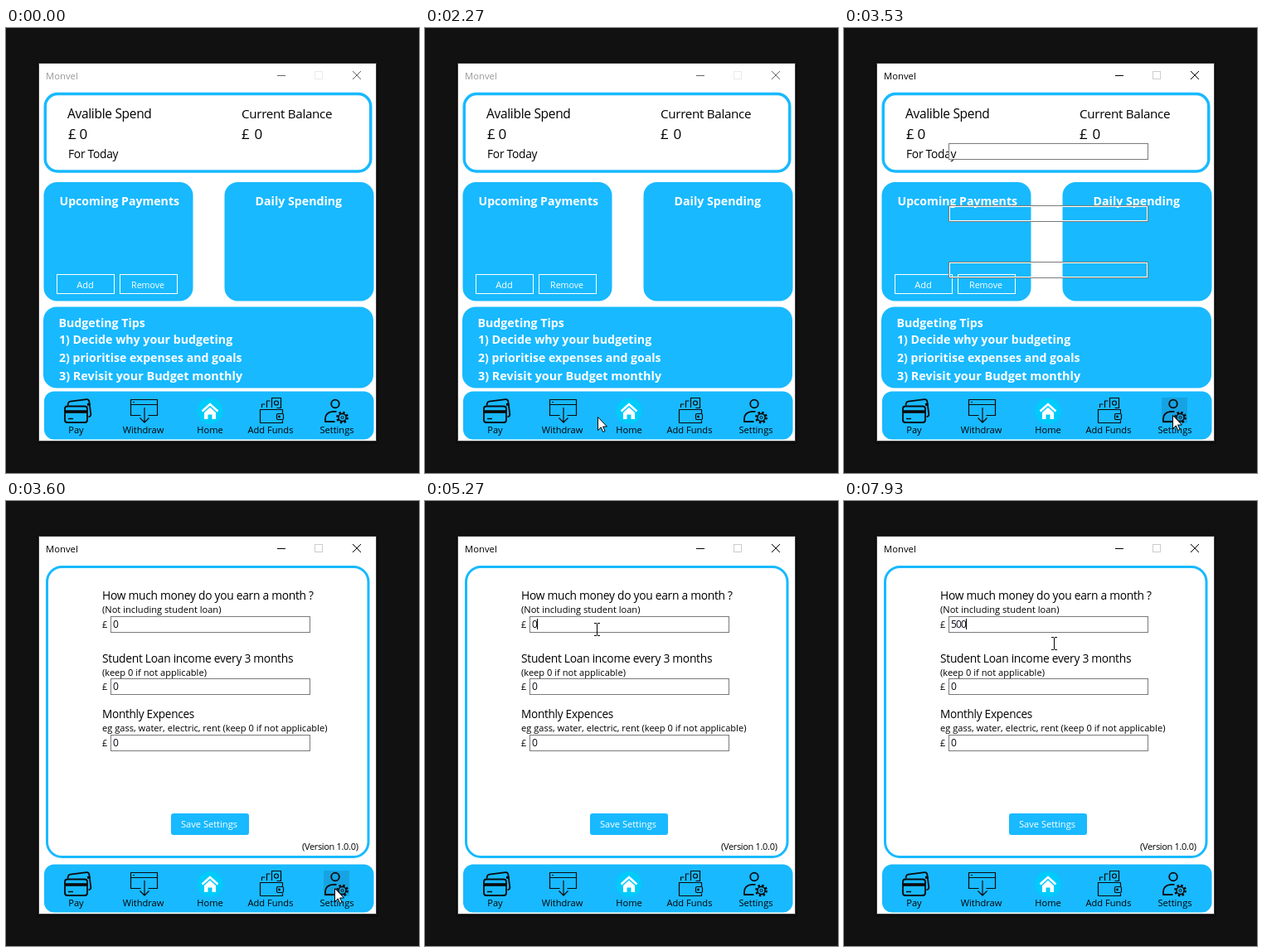
These frames come from a looping animation (498x537 px, 8000 ms). An HTML page:

```html
<!DOCTYPE html>
<html lang="en">
<head>
<meta charset="utf-8">
<title>Budget app</title>
<style>
  html, body { margin: 0; width: 100%; height: 100%; overflow: hidden; background: #111; }
  svg { display: block; width: 498px; height: 537px; }
  text { font: 500 11.1px "Open Sans", "Noto Sans", sans-serif; fill: #000; white-space: pre; }
  .big { font-weight: 400; letter-spacing: -.02em; }
  .head { font-weight: 700; fill: #fff; }
  .mid { text-anchor: middle; }
  .light { fill: #fff; }
  .value { font-size: 12px; font-weight: 400; letter-spacing: -.86px; fill: #0a0a18; }
  .blue { fill: #18b9ff; }
  .frame { fill: #fff; stroke: #18b9ff; }
  .icon { fill: none; stroke: #0a0a0a; stroke-linejoin: round; }
  .hover { fill: #17a3e2; visibility: hidden; }
  .crisp { shape-rendering: crispEdges; }
</style>
</head>
<body>
<svg viewBox="0 0 498 537">
  <rect width="498" height="537" fill="#111"/>
  <rect x="37" y="41" width="412" height="461" rx="3" fill="#0c0c0c"/>
  <rect x="39" y="42" width="408" height="457" fill="#3a3a3a"/>
  <rect x="40" y="43" width="406" height="455" fill="#fff"/>

  <text id="title" x="48" y="62" style="font-size:11.3px;font-weight:400">Monvel</text>
  <g id="bar">
    <path class="crisp" d="M327 57.5h10" stroke="#000"/>
    <path id="max" class="crisp" d="M372.5 52.5h9v9h-9z" fill="none"/>
    <path d="M418 52l10 10m0-10l-10 10" stroke="#000"/>
  </g>

  <g id="home">
    <rect class="frame" x="47.25" y="79.5" width="392.5" height="93.5" rx="15" stroke-width="3.5"/>
    <text class="big" x="74" y="109" style="font-size:15.5px">Avalible Spend</text>
    <text class="big" x="284" y="109" style="font-size:15.2px">Current Balance</text>
    <text class="big" x="75" y="134" style="font-size:17px">£ 0</text>
    <text class="big" x="284" y="134" style="font-size:17px;word-spacing:2px">£ 0</text>
    <text class="big" x="75" y="157" style="font-size:13.8px">For Today</text>

    <rect class="blue" x="45.5" y="186" width="180" height="143.5" rx="16"/>
    <rect class="blue" x="263.5" y="186" width="180" height="143.5" rx="16"/>
    <rect class="blue" x="45" y="336.5" width="398" height="98" rx="16"/>
    <text class="head" x="64.5" y="214" style="font-size:14.1px">Upcoming Payments</text>
    <text class="head" x="300.5" y="214" style="font-size:14.2px">Daily Spending</text>
    <path class="crisp" d="M61.5 297.5h69v23h-69zM137.5 297.5h69v23h-69z" fill="none" stroke="#fff"/>
    <text class="mid light" x="95.5" y="314">Add</text>
    <text class="mid light" x="171" y="314" style="font-size:10.6px">Remove</text>
    <text class="head" x="63.5" y="361" style="font-size:14.2px">Budgeting Tips</text>
    <text class="head" x="64" y="381" style="font-size:14.2px">1) Decide why your budgeting</text>
    <text class="head" x="64" y="403" style="font-size:14.1px">2) prioritise expenses and goals</text>
    <text class="head" x="64" y="425" style="font-size:14.4px">3) Revisit your Budget monthly</text>
  </g>

  <g id="settings">
    <rect class="frame" x="49.5" y="79.5" width="387.5" height="350" rx="18" stroke-width="3"/>
    <text class="big" x="116" y="119" style="font-size:13.8px">How much money do you earn a month ?</text>
    <text x="116" y="135">(Not including student loan)</text>
    <text class="big" x="116" y="195" style="font-size:13.8px">Student Loan income every 3 months</text>
    <text x="116" y="211">(keep 0 if not applicable)</text>
    <text class="big" x="116" y="262" style="font-size:13.6px">Monthly Expences</text>
    <text x="116" y="278">eg gass, water, electric, rent (keep 0 if not applicable)</text>
    <text x="116" y="153">£</text>
    <text x="116" y="228">£</text>
    <text x="116" y="296">£</text>
    <rect class="blue" x="199" y="377" width="94" height="26" rx="3"/>
    <text class="mid light" x="245" y="394">Save Settings</text>
    <text x="357" y="421" style="font-size:11px;font-weight:400;letter-spacing:-.03em">(Version 1.0.0)</text>
  </g>

  <g id="fields" class="crisp"></g>
  <g id="values">
    <text id="typed" class="value" x="129" y="153"></text>
    <text class="value" x="129" y="228">0</text>
    <text class="value" x="129" y="296">0</text>
    <rect id="caret" class="crisp" y="142" width="1" height="13"/>
  </g>

  <rect class="blue" x="46" y="438.5" width="397.5" height="58" rx="12"/>
  <g id="hovers"></g>

  <g class="icon" stroke-width="1.8">
    <rect x="71" y="456.5" width="27" height="19.5" rx="3"/>
    <path d="M71 463h27" stroke-width="3.6"/>
    <path d="M75 471.5h6" stroke-width="1.4"/>
    <path d="M74.5 455.5l.4-2.5q.4-2 2.600-2.300l19.500-2.500q2.800-.2 3.300 2.400l2 15.500q.2 2.600-2.800 3.200"/>
    <path d="M98 454.500l3.500-.5" stroke-width="3"/>
  </g>
  <g class="icon" stroke-width="1.2">
    <path d="M162.500 467.500h-12v-19h32v19h-11M150.500 454.500h32M153 451.500h2"/>
    <path d="M167 458v18m-5.500-5.500l5.500 5.500l5.500-5.500"/>
  </g>
  <g>
    <circle cx="246" cy="462.5" r="15.5" fill="#00cbfa"/>
    <path d="M236.500 462.500l9.500-8.500l9.500 8.500" fill="none" stroke="#fff" stroke-width="2.6"/>
    <path d="M239 464l7-6.200l7 6.200v8h-4.500v-5.500h-5v5.500h-4.500z" fill="#fff"/>
  </g>
  <g class="icon" stroke-width="1.2">
    <path d="M306.500 476.500v-16h27v4.500M306.500 476.500h27v-3"/>
    <rect x="326.5" y="465.5" width="8" height="7" rx="1.5"/>
    <circle cx="329.5" cy="469" r=".8"/>
    <path d="M308.500 458v-4h4M314.500 458v-8h4M320.500 458v-11.500h11v12h-5"/>
    <circle cx="326" cy="452.500" r="2.500"/>
  </g>
  <g class="icon" stroke-width="1.8">
    <circle cx="397" cy="453.5" r="4.8"/>
    <path d="M396.500 475h-11.500v-3q0-8.500 9-9.200h4.500"/>
    <circle cx="405.5" cy="470" r="4.6" stroke-width="1.6"/>
    <circle cx="405.5" cy="470" r="6.2" stroke-width="2.4" stroke-dasharray="2.435"/>
    <circle cx="405.5" cy="470" r="1.6" stroke-width="1"/>
  </g>
  <g id="labels"></g>

  <path id="arrow" d="M.5.5v16l3.800-3.600l2.500 5.600l2.300-1l-2.500-5.500h4.900z" fill="#fff" stroke="#000"/>
  <path id="beam" class="crisp" d="M0 .5h3m1 0h3M3.500 1v14M0 15.500h3m1 0h3" fill="none" stroke="#000"/>
</svg>

<script>
const LOOP = 8000, FPS = 15;
const $ = id => document.getElementById(id);
const show = (el, on) => { el.style.visibility = on ? 'visible' : 'hidden'; };

function add(parent, tag, attrs, text = '') {
  const el = document.createElementNS('http://www.w3.org/2000/svg', tag);
  for (const k in attrs) el.setAttribute(k, attrs[k]);
  el.textContent = text;
  return parent.appendChild(el);
}

// Navigation: label, label centre, left edge and width of the icon
const nav = [
  ['Pay', 84.5, 70, 33], ['Withdraw', 165.5, 150, 33], ['Home', 246, 231, 31],
  ['Add Funds', 319, 305, 31], ['Settings', 399, 383, 31]
].map(([name, cx, x, w]) => {
  add($('labels'), 'text', { class: 'mid', x: cx, y: 489 }, name);
  return { x, w, el: add($('hovers'), 'rect', { class: 'hover', x, y: 446, width: w, height: 31 }) };
});

const fields = [139, 214, 282].map(y => ({
  y,
  inner: add($('fields'), 'rect', { x: 127.5, y: y + 1.5, width: 238, height: 17, stroke: '#fff' }),
  outer: add($('fields'), 'rect', { x: 126.5, y: y + .5, width: 240, height: 19, fill: 'none' })
}));

const ease = {
  in: u => u ** 1.5,
  out: u => 1 - (1 - u) ** 2,
  both: u => u * u * (3 - 2 * u),
  hold: () => 0
};

// Pointer: tick, x, y, easing towards the next row
const path = [
  [22, 296, 530, 'out'], [34, 208, 469, 'hold'], [35, 208, 469, 'both'],
  [46, 396, 468, 'hold'], [50, 396, 467, 'hold'], [54, 396, 467, 'in'],
  [64, 290, 223, 'out'], [68, 184, 143, 'both'], [77, 207, 155, 'hold'],
  [119, 253, 172, 'hold']
];

// Typed text by start tick
const typing = [[0, '0'], [89, ''], [110, '5'], [111, '50'], [115, '500']];
const caretOn = [[79, 88], [89, 97], [105, 120]];

const lastFrom = (rows, n) => rows.filter(r => r[0] <= n).pop();

function pointer(n) {
  const a = lastFrom(path, n);
  if (!a || (n >= 110 && n < 119)) return null;
  const b = path[path.indexOf(a) + 1] || a;
  const k = b === a ? 0 : ease[a[3]]((n - a[0]) / (b[0] - a[0]));
  return { x: Math.round(a[1] + (b[1] - a[1]) * k), y: Math.round(a[2] + (b[2] - a[2]) * k) };
}

function draw(n) {
  const active = n >= 52, boxes = n >= 53, page = n >= 54;
  const p = pointer(n);
  const inside = (x, y, w, h) => !!p && p.x >= x && p.x < x + w && p.y >= y && p.y < y + h;

  $('title').style.fill = active ? '#000' : '#999';
  $('bar').setAttribute('opacity', active ? 1 : .6);
  $('max').setAttribute('stroke', active ? '#ccc' : '#ddd');
  show($('home'), !page);
  show($('settings'), page);
  show($('fields'), boxes);
  show($('values'), page);

  nav.forEach(b => show(b.el, inside(b.x, 446, b.w, 31)));

  let overField = false;
  fields.forEach((f, i) => {
    const over = page && inside(126, f.y, 241, 20);
    overField = overField || over;
    f.inner.setAttribute('fill', page ? '#fff' : 'none');
    f.outer.setAttribute('stroke', over && !(i === 0 && n >= 78) ? '#333' : '#7a7a7a');
  });

  const text = lastFrom(typing, n)[1];
  $('typed').textContent = text;
  $('caret').setAttribute('x', 129 + 6 * text.length);
  $('caret').style.visibility = caretOn.some(([a, b]) => n >= a && n < b) ? 'visible' : 'hidden';

  const beam = overField || n >= 119;
  show($('arrow'), p && !beam);
  show($('beam'), p && beam);
  if (p) {
    $('arrow').setAttribute('transform', `translate(${p.x} ${p.y})`);
    $('beam').setAttribute('transform', `translate(${p.x - 3} ${p.y - 8})`);
  }
}

const start = performance.now();
function tick() {
  const t = Math.max(0, performance.now() - start) % LOOP;
  draw(Math.floor((t + 4) * FPS / 1000) % (LOOP * FPS / 1000));
  requestAnimationFrame(tick);
}
tick();
</script>
</body>
</html>
```
